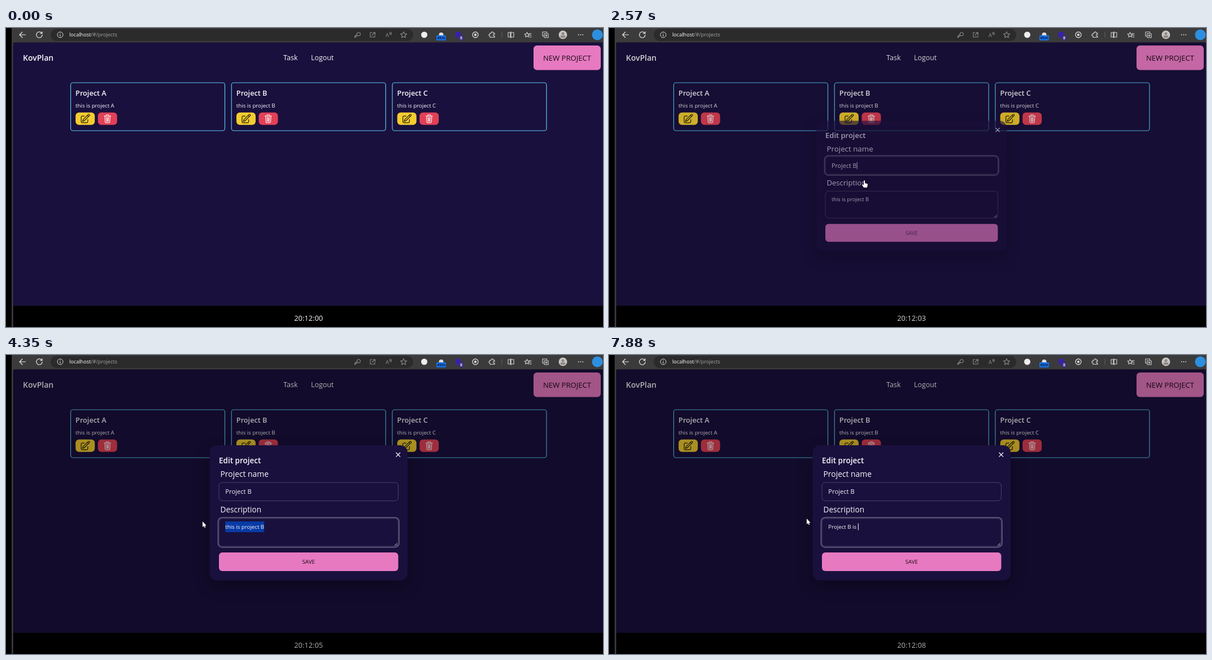
These frames come from a looping animation (1057x530 px, 8 s). An HTML page with a canvas:

```html
<!DOCTYPE html>
<html lang="en">
<head>
<meta charset="utf-8">
<title>Project board</title>
<style>
html, body { margin: 0; width: 100%; height: 100%; overflow: hidden; background: #000; }
canvas { display: block; }
</style>
</head>
<body>
<canvas id="stage" width="1057" height="530"></canvas>
<script>
const ctx = document.getElementById('stage').getContext('2d');
const LOOP = 8000;
const SANS = '"Open Sans", "Noto Sans", sans-serif';
const INK = '#f9f7fd', BASE = '#1a103d', PINK = '#e779c1', CYAN = '#58c7f3',
      YELLOW = '#f3cc30', RED = '#e24056';

const TICKS = [250, 1250, 2250, 3220, 4250, 5300, 6300, 7270];
const OLD = 'this is project B', NEW = 'Project B is ';
// time, number of characters typed
const KEYS = [[5430, 1], [5610, 2], [5970, 3], [6190, 4], [6300, 5], [6490, 6],
  [6600, 7], [6830, 8], [7270, 9], [7470, 11], [7570, 12], [7880, 13]];
// time, x, y of the pointer tip
const PATH = [[930, 896, 430], [1100, 705, 372], [1300, 560, 330], [1460, 494, 288],
  [1680, 433, 180], [1800, 428, 166], [2400, 428, 166], [2570, 452, 270], [2670, 453, 272],
  [3220, 460, 282], [3560, 477, 301], [3690, 477, 301], [4090, 351, 296], [4190, 347, 296],
  [4350, 348, 295], [4440, 348, 295], [4530, 349.5, 287], [4790, 349.5, 287], [4800, 350, 288],
  [5600, 350, 288], [5610, 350, 290]];
const PRESS = 2200, RELEASE = 2440, OPEN = 2515, FOCUS = 3560, DRAG_END = 4270;

const PEN = new Path2D('M16.9 4.5l1.7-1.7a1.9 1.9 0 1 1 2.6 2.7L10.6 16.1a4.5 4.5 0 0 1-1.9 1.1L6 18l.8-2.7a4.5 4.5 0 0 1 1.1-1.9zl2.6 2.6M18 14v4.8A2.2 2.2 0 0 1 15.8 21H5.2A2.2 2.2 0 0 1 3 18.8V8.2A2.2 2.2 0 0 1 5.2 6H10');
const TRASH = new Path2D('M4.5 6H19.5M9 5.5V4Q9 3 10 3H14Q15 3 15 4V5.5M6 6L6.8 19.5Q7 21 8.5 21H15.5Q17 21 17.2 19.5L18 6M9.6 9L10 18M14.4 9L14 18M12 9V18');
const ARROW = new Path2D('M0 0V10L2.3 8L3.8 11.2L5.3 10.5L3.9 7.4L6.8 7.2Z');
const HAND = new Path2D('M-1 .8Q0-.8 1 .8V5L5 6Q6.2 6.4 6 7.6L5 12.8H-1L-4 8.3Q-4.2 6.8-3 7L-1 8.5Z');
const STAR = new Path2D('M0-5.5L1.6-1.9L5.5-1.5L2.6 1.1L3.4 5L0 3L-3.4 5L-2.6 1.1L-5.5-1.5L-1.6-1.9Z');

// y is the middle of the capitals
function text(str, x, y, size, { color = INK, weight = 400, align = 'left' } = {}) {
  ctx.font = `${weight} ${size}px ${SANS}`;
  ctx.textAlign = align;
  ctx.fillStyle = color;
  ctx.fillText(str, x, y + size * 0.357);
}

function box(x, y, w, h, r, fill, stroke, lw = 1) {
  ctx.beginPath();
  ctx.roundRect(x, y, w, h, r);
  paint(fill, stroke, lw);
}

function disc(x, y, r, fill, stroke, lw = 1) {
  ctx.beginPath();
  ctx.arc(x, y, r, 0, Math.PI * 2);
  paint(fill, stroke, lw);
}

function paint(fill, stroke, lw) {
  if (fill) { ctx.fillStyle = fill; ctx.fill(); }
  if (stroke) { ctx.strokeStyle = stroke; ctx.lineWidth = lw; ctx.stroke(); }
}

function outline(path, x, y, scale, color, lw = 1) {
  ctx.save();
  ctx.translate(x, y);
  ctx.scale(scale, scale);
  ctx.lineCap = ctx.lineJoin = 'round';
  ctx.strokeStyle = color;
  ctx.lineWidth = lw / scale;
  ctx.stroke(typeof path === 'string' ? new Path2D(path) : path);
  ctx.restore();
}

function browserBar() {
  ctx.fillStyle = '#3b3b3b';
  ctx.fillRect(10, 0, 1047, 26);
  ctx.fillRect(10, 0, 3, 530);
  box(79, 1.5, 642, 21.5, 10.7, '#2b2b2b');
  const line = (d, x, color = '#d8d8d8') => outline(d, x, 12, 1, color, 1.1);
  line('M5.5 0H-5M0-5L-5 0L0 5', 29, '#eee');
  line('M4.6-2.4A5.2 5.2 0 1 0 5.2 0M5-5.5V-2.2H1.6', 59, '#eee');
  disc(96, 12, 5, null, '#d8d8d8');
  line('M0-.5V2.6M0-2.6V-2.4', 96);
  text('localhost', 112, 12, 9.15, { color: '#fff' });
  const host = ctx.measureText('localhost').width;
  text('/#/projects', 112 + host, 12, 9.15, { color: '#a5a5a5' });

  const dim = '#8c8c8c';
  line('M.5 1L-4.5 5V3L-.5-1A3 3 0 1 1 .5 1', 622, dim);
  line('M-1-4H-4V4H4V1M1-4H4.5V-.5M4-4L-.5 .5', 649, dim);
  text('A', 672, 13, 9.5, { color: dim });
  line('M2-4Q3.5-2.5 2.5-.5M4-5Q6-2.5 4.5 0', 677, dim);
  line(STAR, 704, dim);

  disc(740.5, 12, 5.5, '#eee');
  disc(770.5, 12, 4, '#ddd');
  box(762, 13, 17, 9, 1.5, '#1a73e8');
  text('45m', 770.5, 17.6, 7, { color: '#05102c', weight: 600, align: 'center' });
  box(796, 7, 9, 10, 1, '#3a1fb0');
  box(801.5, 13, 9, 9, 1.5, '#39307a');
  text('8', 806, 17.6, 7, { color: '#fff', weight: 600, align: 'center' });
  disc(831, 12, 5, null, '#d8d8d8', 1.3);
  disc(831, 12, 2.2, '#d8d8d8');
  line('M-4-3H-1.5A1.6 1.6 0 1 1 1.5-3H4V-.5A1.6 1.6 0 1 0 4 2.3V4.5H-4V2A1.6 1.6 0 1 1-4-1Z', 861);
  ctx.fillStyle = '#606060';
  ctx.fillRect(877.5, 7, 1, 10);
  line('M-1-4H-5V4H-1ZM1-4H5V4H1M0-5.5V5.5', 894);
  outline(STAR, 922.5, 12, 0.8, '#d8d8d8', 1.1);
  line('M2-2H6M2 1H6M3 4H6', 924);
  line('M-2-2H5V5H-2ZM-3.5 2.5H-5V-5H2.5V-3.5M1.5-.2V3.2M-.2 1.5H3.2', 955);
  disc(986, 12, 7.5, '#c9c5c1');
  disc(986, 10, 2.5, '#8d8883');
  box(981.5, 13.2, 9, 4, 2, '#8d8883');
  for (let i = -1; i < 2; i++) disc(1017.5 + i * 3.7, 12, 0.9, '#ddd');
  disc(1047, 12, 9.5, '#2d8fe0');
}

function iconButton(x, y, fill, icon, color, scale = 1) {
  ctx.save();
  ctx.translate(x + 17, y + 11);
  ctx.scale(scale, scale);
  box(-17, -11, 34, 22, 6, fill);
  outline(icon, -9.4, -9.4, 0.78, color, 1.2);
  ctx.restore();
}

function card(letter, i, pressed) {
  const x = 114.5 + i * 284.75;
  box(x, 97, 273, 85, 4, null, CYAN, 1.2);
  text('Project ' + letter, x + 8.6, 115, 12.7, { weight: 600 });
  text('this is project ' + letter, x + 8.6, 138, 9.7);
  iconButton(x + 8.7, 149.8, YELLOW, PEN, '#201c06', pressed ? 0.95 : 1);
  iconButton(x + 48.2, 149.8, RED, TRASH, '#fbe9ec');
}

function page(t) {
  box(12.5, 25.5, 1060, 520, 5, BASE);
  ctx.fillStyle = '#000';
  ctx.fillRect(13, 492.5, 1044, 38);
  text('KovPlan', 30, 53, 14, { weight: 600 });
  text('Task', 491, 53, 12.6);
  text('Logout', 540, 53, 12.4);
  box(934, 31, 119, 43.5, 6, PINK);
  text('NEW PROJECT', 993.5, 53, 13.1, { color: '#1c0b18', align: 'center' });
  ['A', 'B', 'C'].forEach((c, i) => card(c, i, i === 1 && t >= PRESS && t < RELEASE));
  const sec = TICKS.filter(k => t >= k).length;
  text('20:12:0' + sec, 535.7, 514, 12.9, { align: 'center' });
}

function field(y, h, focused) {
  box(377, y, 317.5, h, 6, null, 'rgba(249,247,253,.22)');
  if (focused) box(375.4, y - 1.8, 320.7, h + 3.6, 7.5, null, 'rgba(249,247,253,.34)', 1.5);
}

function caret(x, y, h) {
  ctx.fillStyle = INK;
  ctx.fillRect(x, y - h / 2, 1, h);
}

function description(t) {
  const x = 388.3, y = 305;
  const key = KEYS.filter(k => t >= k[0]).pop();
  const str = key ? NEW.slice(0, key[1]) : OLD;
  ctx.font = `400 9.7px ${SANS}`;
  const w = ctx.measureText(str).width;
  const from = pointer(Math.min(t, DRAG_END)).x;
  const selecting = !key && t > 3690 && from < x + w;
  if (selecting) {
    // snap the selection edge to whole characters
    let n = 0;
    while (n < str.length && x + ctx.measureText(str.slice(0, n + 1)).width <= from) n++;
    const left = ctx.measureText(str.slice(0, n)).width;
    ctx.fillStyle = '#073ba6';
    ctx.fillRect(x + left, 295, w - left, 19);
  }
  text(str, x, y, 9.7);
  if (t >= FOCUS && !selecting) caret(x + w + 0.3, 304.5, 12);
}

function modal(t) {
  // the opening pose advances in 100 ms steps
  const q = 70 + 100 * Math.floor((t - 70) / 100);
  if (q < OPEN) return;
  const u = Math.min(1, (q - OPEN) / 200);
  const p = q >= 2670 ? 1 : 1 - (1 - u) ** 3;
  ctx.fillStyle = `rgba(0,0,0,${0.3 * p ** 1.4})`;
  ctx.fillRect(13, 25.5, 1044, 505);

  ctx.save();
  ctx.globalAlpha = p;
  ctx.translate(535.5, 279.7);
  ctx.scale(0.9 + 0.1 * p, 0.9 + 0.1 * p);
  ctx.translate(-535.5, -279.7);
  ctx.save();
  ctx.shadowColor = 'rgba(0,0,0,.28)';
  ctx.shadowBlur = 28;
  ctx.shadowOffsetY = 10;
  box(360.5, 160, 350.5, 239.5, 13, BASE);
  ctx.restore();
  outline('M-3.4-3.4L3.4 3.4M3.4-3.4L-3.4 3.4', 694.3, 176.7, 1, INK, 1.3);
  text('Edit project', 377, 187, 13.5, { weight: 600 });
  text('Project name', 379.5, 211.3, 13.9);
  const onName = t < FOCUS;
  field(226, 32.5, onName);
  text('Project B', 388.3, 242.5, 11.2);
  const end = 388.3 + ctx.measureText('Project B').width;
  if (onName && (t - OPEN) % 1060 < 530) caret(end + 0.3, 242.5, 13);
  text('Description', 379.5, 274.3, 13.6);
  field(289.7, 49.5, !onName);
  description(t);
  outline('M-4.5 0L0-4.5M-1.8 0L0-1.8', 692.5, 338, 1, '#cfcbd8', 0.9);
  box(377, 350, 317.5, 33, 6, PINK);
  text('SAVE', 535.7, 366.7, 9.8, { color: '#1c0b18', align: 'center' });
  ctx.restore();
}

function pointer(t) {
  const i = PATH.findIndex(k => k[0] > t);
  if (i < 0) { const [, x, y] = PATH[PATH.length - 1]; return { x, y }; }
  const [t0, x0, y0] = PATH[Math.max(0, i - 1)], [t1, x1, y1] = PATH[i];
  const u = Math.max(0, (t - t0) / (t1 - t0));
  return { x: x0 + (x1 - x0) * u, y: y0 + (y1 - y0) * u };
}

function cursor(t) {
  if (t < PATH[0][0]) return;
  const { x, y } = pointer(t);
  const down = (t >= PRESS && t < RELEASE) || (t >= FOCUS && t < DRAG_END);
  if (down) disc(x + 0.5, y + 0.5, 8, 'rgba(255,240,0,.52)');
  const hand = t > 1740 && t < 3220;
  ctx.save();
  ctx.translate(x, y);
  ctx.lineJoin = 'round';
  ctx.lineWidth = 1.4;
  ctx.strokeStyle = '#0b0718';
  ctx.fillStyle = '#fff';
  const shape = hand ? HAND : ARROW;
  ctx.stroke(shape);
  ctx.fill(shape);
  ctx.restore();
}

const start = performance.now();
function draw() {
  const t = (performance.now() - start) % LOOP;
  ctx.fillStyle = '#000';
  ctx.fillRect(0, 0, 1057, 530);
  browserBar();
  page(t);
  modal(t);
  cursor(t);
  requestAnimationFrame(draw);
}
draw();
</script>
</body>
</html>
```
